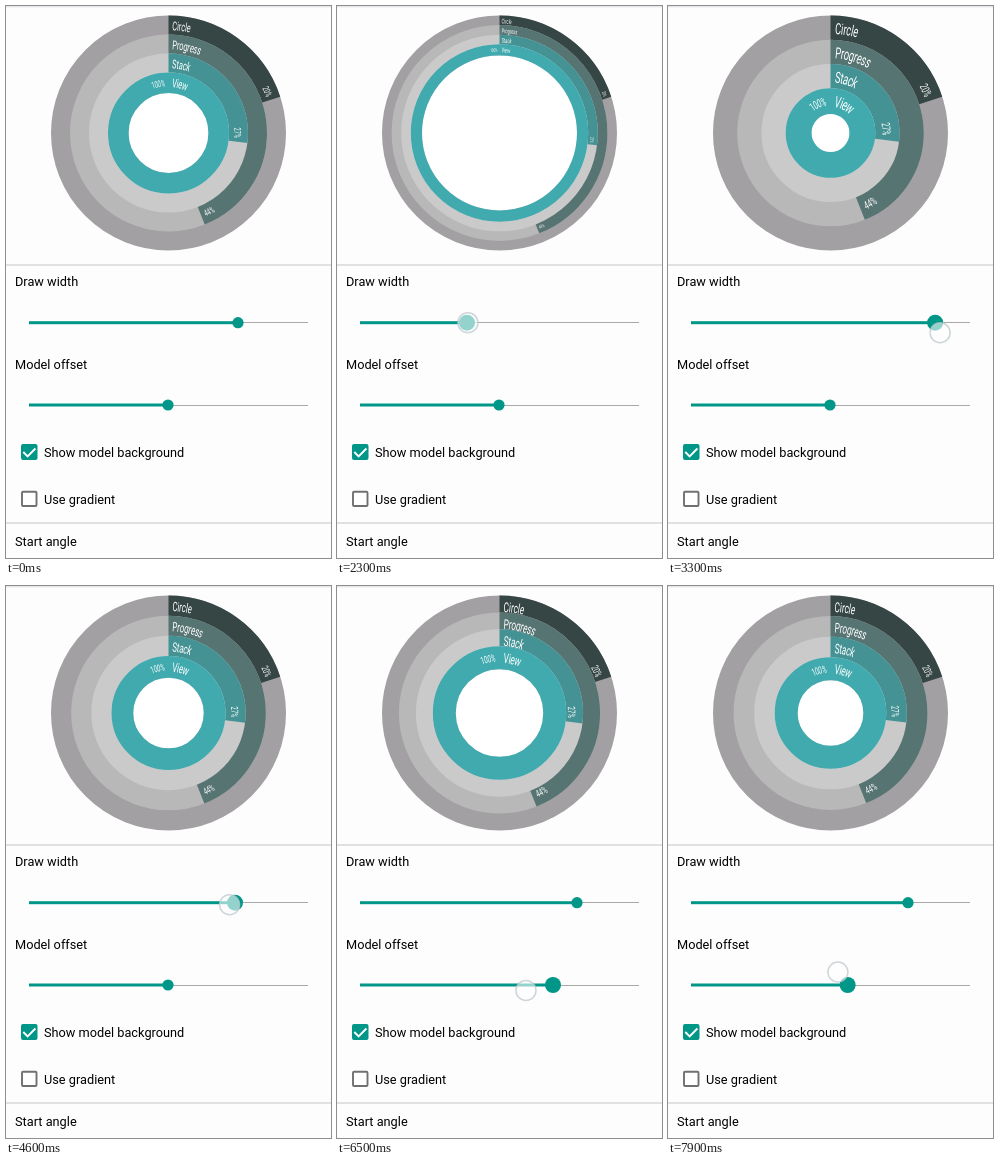
An HTML page with a canvas for the animation above (8000 ms loop, 325 by 552 pixels).

```html
<!DOCTYPE html>
<html lang="en">
<head>
<meta charset="utf-8">
<title>Stacked ring settings</title>
<style>
  html, body { margin: 0; width: 100%; height: 100%; overflow: hidden; background: #fdfdfd; }
  svg, canvas { position: absolute; left: 0; top: 0; }
  text { font: 12.75px Roboto, sans-serif; fill: #000; }
</style>
</head>
<body>
<svg width="325" height="552">
  <path d="M0 .5H325" stroke="#e6e6ea"/>
  <path d="M0 1.5H325" stroke="#f4f4f6"/>
  <path d="M0 259H325M0 517H325" stroke="#d9d9d9" stroke-width="1.3"/>
  <text x="9" y="280">Draw width</text>
  <text x="9" y="362.5">Model offset</text>
  <text x="38" y="451">Show model background</text>
  <text x="38" y="497.5">Use gradient</text>
  <text x="9" y="540">Start angle</text>
  <rect x="15" y="438" width="16.5" height="16" rx="2" fill="#009688"/>
  <path d="M17.3 446l4.3 4.3 7.8-7.8" fill="none" stroke="#fff" stroke-width="1.9"/>
  <rect x="16" y="485.8" width="14.5" height="14.2" rx="1" fill="#fff" stroke="#707070" stroke-width="1.9"/>
</svg>
<canvas id="view" width="325" height="552"></canvas>
<script>
const ctx = document.getElementById('view').getContext('2d');
const LOOP = 8000, STEP = 100, TAU = Math.PI * 2;
const CX = 162.5, CY = 127, RADIUS = 117.5, OVERLAP = 1.6;
const LEFT = 23, RIGHT = 302, TEAL = '#009688';
const CONDENSED = 0.6;
const FINGER_LEAD = 60;

const models = [
  { title: 'Circle', value: 20, color: '#354645', back: '#a2a0a2' },
  { title: 'Progress', value: 44, color: '#567472', back: '#b9b8b9' },
  { title: 'Stack', value: 27, color: '#459295', back: '#cbcacb' },
  { title: 'View', value: 100, color: '#40aaae', back: '#dcdcdd' }
];

// Turning points [time, x] of each thumb, joined by cosine easing.
const widthTurns = [[1500, 232], [2300, 130], [3500, 277], [4000, 277], [4900, 213], [5200, 256], [5500, 240]];
const offsetTurns = [[6000, 162], [6350, 262], [6650, 170], [7500, 290], [8000, 168]];
// Vertical distance of the finger from the track.
const fingerDrift = [[2300, 0], [3300, 10], [4600, 2], [7100, 6], [7900, -13]];

function swing(turns, t) {
  const next = turns.findIndex(turn => turn[0] > t);
  if (next === 0) return turns[0][1];
  if (next < 0) return turns[turns.length - 1][1];
  const [t0, a] = turns[next - 1], [t1, b] = turns[next];
  return a + (b - a) * (1 - Math.cos(Math.PI * (t - t0) / (t1 - t0))) / 2;
}

function ring(r, width, part, color) {
  ctx.beginPath();
  ctx.arc(CX, CY, r, -TAU / 4, TAU * (part - 0.25));
  ctx.lineWidth = width;
  ctx.strokeStyle = color;
  ctx.stroke();
}

function disc(x, y, r, fill) {
  ctx.beginPath();
  ctx.arc(x, y, r, 0, TAU);
  ctx.fillStyle = fill;
  ctx.fill();
}

function setFont(size) {
  ctx.font = `${size}px Roboto, sans-serif`;
}

const textWidth = s => ctx.measureText(s).width * CONDENSED;

// Sets glyphs along the ring; flipped text stays upright on the lower half.
function arcText(s, r, center, size, flip) {
  const dir = flip ? -1 : 1;
  let pos = -textWidth(s) / 2;
  for (const ch of s) {
    const w = textWidth(ch);
    ctx.save();
    ctx.translate(CX, CY);
    ctx.rotate(center + dir * (pos + w / 2) / r);
    ctx.translate(0, -r);
    if (flip) ctx.rotate(Math.PI);
    ctx.scale(CONDENSED, 1);
    ctx.fillText(ch, 0, size * 0.36);
    ctx.restore();
    pos += w;
  }
}

function drawRings(width, spacing) {
  ctx.textAlign = 'center';
  models.forEach((m, i) => {
    const r = RADIUS - i * spacing - width / 2;
    const pad = width * 0.18;
    ring(r, width, 1, m.back);
    ring(r, width, m.value / 100, m.color);
    ctx.fillStyle = '#fff';

    const titleSize = width * 0.6;
    setFont(titleSize);
    arcText(m.title, r, (pad + textWidth(m.title) / 2) / r, titleSize);

    const label = m.value + '%', labelSize = width * 0.45;
    setFont(labelSize);
    const center = TAU * m.value / 100 - (pad + textWidth(label) / 2) / r;
    arcText(label, r, center, labelSize, m.value > 30 && m.value < 70);
  });
}

function slider(x, y, pressed) {
  ctx.fillStyle = '#a9a9a9';
  ctx.fillRect(LEFT, Math.floor(y), RIGHT - LEFT, 1);
  ctx.fillStyle = TEAL;
  ctx.fillRect(LEFT, y - 1.5, x - LEFT, 3);
  disc(x, y, pressed ? 8 : 5.6, TEAL);
}

function finger(turns, y, t) {
  disc(swing(turns, t + FINGER_LEAD), y + swing(fingerDrift, t), 10, 'rgba(255,255,255,.58)');
  ctx.lineWidth = 1.5;
  ctx.strokeStyle = 'rgba(190,200,204,.75)';
  ctx.stroke();
}

function draw(t) {
  const widthX = swing(widthTurns, t), offsetX = swing(offsetTurns, t);
  // The rings follow the width slider only once it is touched.
  const width = t < 1500 ? 20.6 : 11.2 + (widthX - 130) * 0.1067;
  const spacing = width - OVERLAP - Math.max(0, offsetX - 172) * 0.1;
  const onWidth = t >= 1500 && t < 5500 && !(t >= 3800 && t < 4000);
  const onOffset = t >= 6000;

  ctx.clearRect(0, 0, 325, 552);
  disc(CX, CY, RADIUS, '#fff');
  drawRings(width, spacing);
  slider(widthX, 316.7, onWidth);
  slider(offsetX, 399, onOffset);
  if (onWidth) finger(widthTurns, 316.7, t);
  if (onOffset) finger(offsetTurns, 399, t);
}

const start = performance.now();
function tick() {
  const t = (performance.now() - start) % LOOP;
  draw(Math.floor(t / STEP) * STEP);
  requestAnimationFrame(tick);
}
tick();
</script>
</body>
</html>
```
